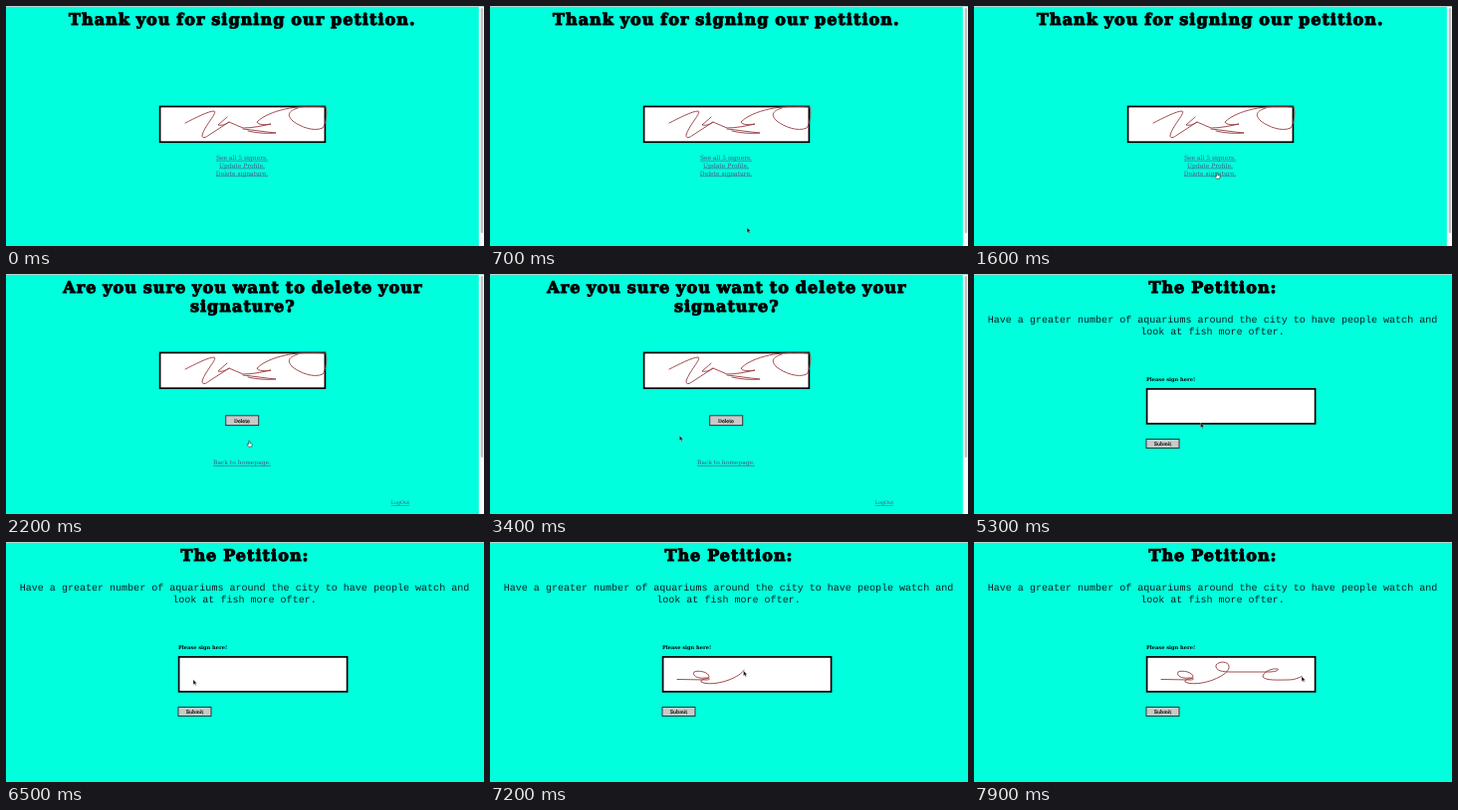
These frames come from a looping animation (480x242 px, 8 s). An HTML page:

```html
<!DOCTYPE html>
<html lang="en">
<head>
<meta charset="utf-8">
<title>Petition</title>
<style>
  html, body { margin: 0; width: 100%; height: 100%; overflow: hidden; background: #00ffdd; }
  svg { display: block; width: 100vw; height: 100vh; }
  text { font-family: "DejaVu Serif", serif; text-rendering: geometricPrecision; }
  .title { font-size: 16px; font-weight: bold; text-anchor: middle; letter-spacing: 1.05px; word-spacing: -.8px;
    stroke: #000; stroke-width: 1; }
  .link { font-size: 5.97px; text-anchor: middle; fill: #4f5480; text-decoration: underline .45px; }
  .body { font: 10.04px "Liberation Mono", monospace; text-anchor: middle; fill: #06211f; }
  .label { font-size: 5.1px; font-weight: bold; }
  .button text { font-size: 4.85px; text-anchor: middle; stroke: #000; stroke-width: .15; }
  .button rect { fill: #c9c9c9; stroke: #2b3634; }
  .button.focus rect { stroke: #1b5579; stroke-width: 1.6; }
  .box { fill: #fff; stroke: #000; stroke-width: 1.7; }
  .ink { fill: none; stroke: #98383c; stroke-width: .9; stroke-linecap: round; stroke-linejoin: round; }
</style>
</head>
<body>
<svg viewBox="0 0 480 242">
  <defs>
    <g id="signed">
      <rect class="box" x="154.6" y="101.4" width="165.8" height="35.8"/>
      <path class="ink" d="M180 118C190 113 203 106 209 106C213 107 200 120 197 130C197 134 200 133 204 130
        L224 117M222 112L213 120C217 121 221 119 224 117L238 123
        C247 123 257 121 266 119C260 120 253 120 252 117C260 109 274 105 285 103C297 101 310 101 321 102
        C323 108 321 119 318 123C309 127 296 122 288 116C282 110 283 106 293 103
        M238 124C248 125 260 127 271 128C261 129 251 128 243 126"/>
    </g>
  </defs>
  <rect width="480" height="242" fill="#00ffdd"/>

  <g id="thanks">
    <text class="title" x="237.3" y="19.3">Thank you for signing our petition.</text>
    <use href="#signed"/>
    <text class="link" x="237" y="154.8">See all 5 signers.</text>
    <text class="link" x="237" y="162.6">Update Profile.</text>
    <text class="link" x="237" y="170.5">Delete signature.</text>
  </g>

  <g id="confirm">
    <text class="title" x="237.8" y="19.3">Are you sure you want to delete your</text>
    <text class="title" x="237.8" y="38.2">signature?</text>
    <use href="#signed" y="-22"/>
    <g class="button" id="delete">
      <rect x="220.7" y="142.8" width="33" height="9.8"/>
      <text x="237" y="149.6">Delete</text>
    </g>
    <text class="link" x="237" y="192.2">Back to homepage.</text>
    <text class="link" x="396" y="232.2" style="font-size:4.9px">LogOut</text>
  </g>

  <g id="petition">
    <text class="title" x="240" y="19.3">The Petition:</text>
    <text class="body" x="239.5" y="49.3">Have a greater number of aquariums around the city to have people watch and</text>
    <text class="body" x="239.5" y="61">look at fish more ofter.</text>
    <text class="label" x="173" y="108">Please sign here!</text>
    <rect class="box" x="173.6" y="115.9" width="169" height="35"/>
    <path class="ink" id="ink" d="M188 138.5L217 139C222 139 221 137 217 137C208 138 203 135 205 131
      C209 129 220 131 220 136C219 139 211 137 212 141C217 144 230 143 240 139
      C250 135 257 130 256 125C255 120 246 120 243 124C242 130 250 131 258 131
      L296 131C303 131 307 129 305 128C299 127 290 131 290 136C293 140 306 139 316 139C322 139 326 137 329 135.5"/>
    <g class="button">
      <rect x="173" y="166.5" width="33" height="9"/>
      <text x="189.5" y="172.8">Submit</text>
    </g>
  </g>

  <g id="bar">
    <rect x="474.8" width="5.2" height="242" fill="#f4fbfa"/>
    <rect id="thumb" x="476.7" y="2" width="2.4" rx="1.2" fill="#bdc3c3"/>
  </g>
  <rect width="480" height="1" fill="#b4dcd6"/>

  <g id="cursor">
    <path id="arrow" d="M0 0V5L1.2 4L2 5.8L2.9 5.4L2.1 3.7H3.7Z" fill="#111" stroke="#eee" stroke-width=".3"/>
    <path id="hand" d="M-.6 -2.6Q0 -3.4 .6 -2.6V-.6L2.4 0Q3 .3 2.8 1.4L2.2 3.2H-.7L-2.3 1Q-2.3 0 -1.3 .4L-.6 .9Z"
      fill="#fff" stroke="#222" stroke-width=".6"/>
  </g>
</svg>
<script>
const LOOP = 8000;
const PAGE = { confirm: 1900, petition: 5200 };
const SIGN = { start: 6600, end: 7900 };
const el = id => document.getElementById(id);
const show = (id, on) => el(id).style.display = on ? '' : 'none';
const clamp = v => Math.max(0, Math.min(1, v));
const ease = v => v * v * (3 - 2 * v);

// time, x, y of the pointer
const stops = [
  [500, 262, 244], [1000, 251, 186], [1450, 244.3, 171], [2300, 244.3, 171],
  [2900, 190.3, 163], [3650, 190.3, 163], [4300, 227.5, 150], [5800, 227.5, 150],
  [6400, 188, 139], [SIGN.start, 188, 138.5]
];
const ink = el('ink');
const inkLength = ink.getTotalLength();

function signed(t) {
  return clamp((t - SIGN.start) / (SIGN.end - SIGN.start));
}

function pointer(t) {
  if (t >= SIGN.start) {
    const p = ink.getPointAtLength(inkLength * signed(t));
    return [p.x, p.y];
  }
  let i = 0;
  while (i < stops.length - 2 && t > stops[i + 1][0]) i++;
  const [t0, x0, y0] = stops[i], [t1, x1, y1] = stops[i + 1];
  const k = ease(clamp((t - t0) / (t1 - t0)));
  return [x0 + (x1 - x0) * k, y0 + (y1 - y0) * k];
}

function render(t) {
  const page = t < PAGE.confirm ? 'thanks' : t < PAGE.petition ? 'confirm' : 'petition';
  for (const id of ['thanks', 'confirm', 'petition']) show(id, id === page);
  show('bar', page !== 'petition');
  el('thumb').setAttribute('height', page === 'thanks' ? 227 : 183);
  el('delete').classList.toggle('focus', t >= 4950);

  const length = inkLength * signed(t);
  ink.style.visibility = length > 0 ? 'visible' : 'hidden';
  ink.style.strokeDasharray = `${length} ${inkLength + 10}`;

  const hand = t > 1350 && t < 2350;
  show('cursor', t >= 500);
  show('hand', hand);
  show('arrow', !hand);
  el('cursor').setAttribute('transform', `translate(${pointer(t)})`);
}

const begin = performance.now();
function tick() {
  render((performance.now() - begin) % LOOP);
  requestAnimationFrame(tick);
}
tick();
</script>
</body>
</html>
```
